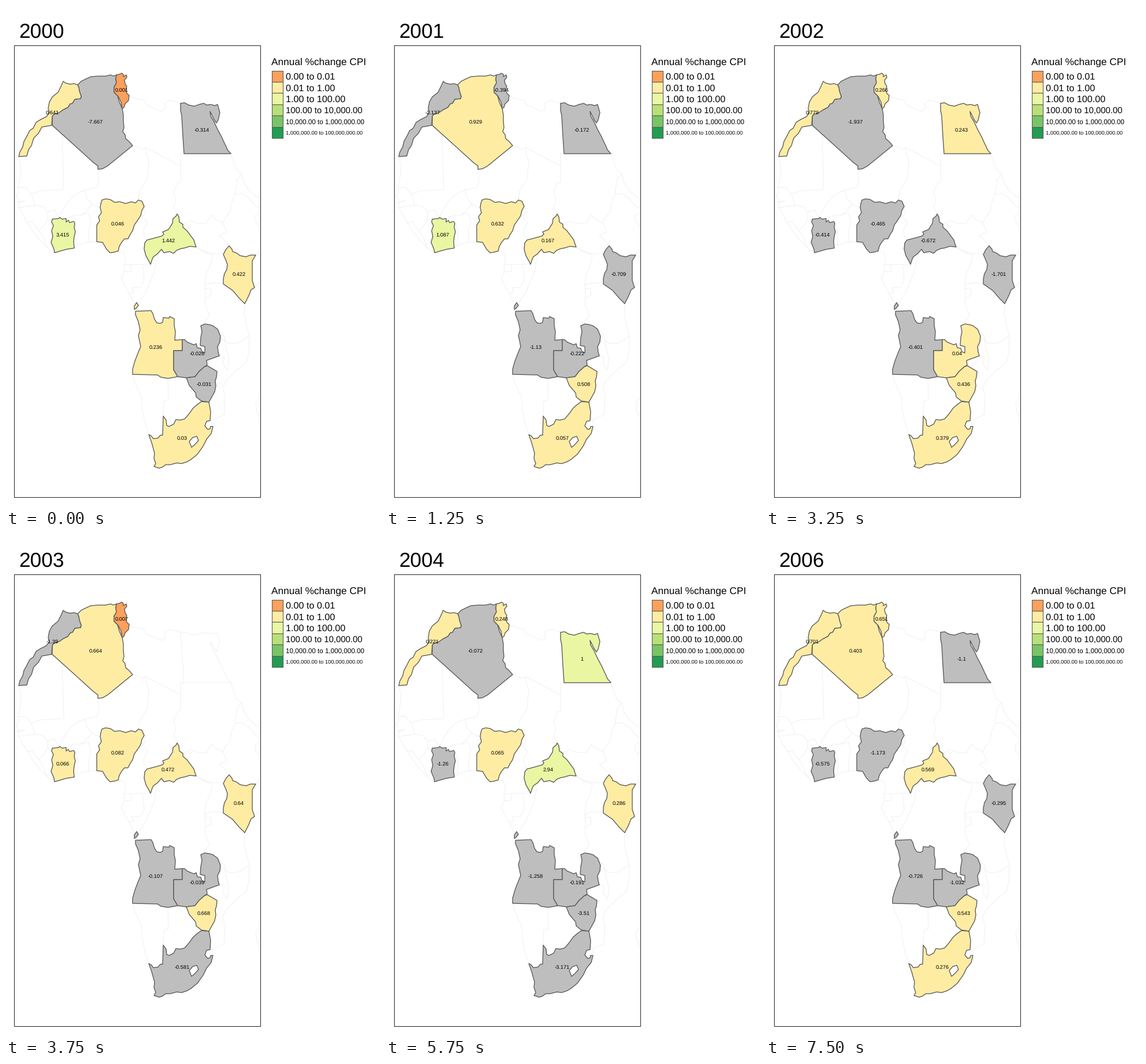
These frames come from a looping animation (647x865 px, 8 s). A matplotlib script:

```python
import matplotlib.pyplot as plt
import numpy as np
from matplotlib.animation import FuncAnimation
from matplotlib.patches import Polygon, Rectangle

W, H, DPI = 647, 865, 72          # at 72 dpi one point is one pixel
INTERVAL, FRAMES, HOLD = 250, 32, 1250
START_YEAR = 2000
EDGE, FAINT, GREY = "#5a5a5a", "#efefef", "#bebebe"
COLORS = ["#fca15b", "#feeca3", "#eaf6a2", "#b8e077", "#78c565", "#229c52"]
BREAKS = [0, 0.01, 1, 100, 1e4, 1e6]

plt.rcParams["font.family"] = "Liberation Sans"
plt.rcParams["text.hinting"] = "none"

fig = plt.figure(figsize=(W / DPI, H / DPI), dpi=DPI, facecolor="white")
ax = fig.add_axes([0, 0, 1, 1])
ax.set_xlim(0, W)
ax.set_ylim(H, 0)
ax.axis("off")

map_frame = Rectangle((13.5, 67.5), 426, 780, fill=False, ec="#222222", lw=1, zorder=6)
ax.add_patch(map_frame)
regions = []


def write(x, y, text, size, **kw):
    """Text whose digits are centred vertically on y."""
    return ax.text(x, y + 0.345 * size, text, size=size, color="black",
                   va="baseline", zorder=8, **kw)


def shape(points, color="white", zorder=3):
    patch = Polygon(points, closed=True, fc=color, ec=EDGE, lw=1.35,
                    joinstyle="round", zorder=zorder)
    return ax.add_patch(patch)


def region(label_at, values, *outlines):
    """A country with one value per year."""
    patches = [shape(o) for o in outlines]
    label = write(*label_at, "", 9.3, ha="center")
    regions.append((values, patches, label))


def border(*points):
    """A faint outline of a country without data."""
    x, y = zip(*points)
    line, = ax.plot(x, y, color=FAINT, lw=0.9, zorder=1)
    line.set_clip_path(map_frame)


# Northern neighbours
border((213, 155), (225, 160), (240, 163), (242, 170), (255, 176), (269, 182),
       (276, 178), (274, 168), (283, 163), (293, 165), (302, 168))
border((302, 168), (302, 180), (304, 190), (306, 225), (308, 255), (389, 255),
       (383, 248), (378, 237), (366, 213), (354, 190), (353, 183), (364, 202),
       (370, 184), (366, 170), (350, 170), (342, 168), (326, 173), (309, 168),
       (302, 168))
border((219, 241), (229, 244), (235, 248), (241, 244), (302, 276), (302, 255), (308, 255))
border((241, 244), (243, 256), (247, 268), (244, 300), (231, 320), (229, 335))
border((302, 276), (302, 304), (296, 306), (290, 322), (294, 335), (290, 346), (296, 359))
border((389, 255), (394, 270), (399, 283), (408, 290), (411, 303), (420, 318),
       (430, 327), (439, 332))
border((408, 290), (400, 299), (398, 312), (396, 325), (390, 340), (388, 355),
       (379, 366), (375, 374), (382, 390), (369, 396), (380, 406), (386, 414))
border((396, 325), (408, 324), (422, 333), (432, 346), (439, 349))
border((439, 357), (430, 363), (432, 373), (439, 380))
border((306, 377), (318, 371), (330, 375), (346, 376), (355, 361), (362, 368), (375, 374))

# Western neighbours
border((22, 260), (26, 275), (25, 290), (21, 314), (22, 322), (18, 328), (22, 338),
       (22, 348), (30, 362), (37, 374), (46, 388), (60, 406), (72, 418), (84, 426))
border((79, 206), (97, 222), (100, 317), (62, 319), (50, 322), (44, 325), (34, 313),
       (22, 314))
border((44, 325), (50, 344), (36, 346), (22, 348))
border((20, 338), (33, 336), (20, 341))
border((50, 344), (64, 346), (72, 356), (72, 368), (79, 372))
border((72, 368), (66, 379), (57, 388), (50, 380), (46, 372), (37, 374))
border((57, 388), (64, 398), (72, 418))
border((72, 356), (84, 352), (92, 367))
border((159, 282), (161, 300), (158, 313), (136, 318), (126, 322), (114, 330),
       (106, 340), (100, 350), (92, 365))
border((136, 318), (140, 332), (149, 342), (141, 351), (131, 361), (119, 361), (104, 367))
border((149, 342), (157, 347), (163, 347))
border((117, 372), (124, 384), (124, 412))
border((131, 361), (142, 357), (147, 372), (143, 388), (143, 408))
border((118, 417), (132, 410), (145, 407), (157, 407))

# Central neighbours
border((235, 337), (240, 347), (241, 358), (236, 363), (245, 374), (238, 386),
       (239, 396), (244, 404))
border((194, 423), (203, 424), (207, 438), (204, 447), (236, 446), (250, 446))
border((204, 447), (205, 459), (199, 470), (204, 480), (213, 496), (222, 514))
border((216, 447), (217, 458), (205, 459))
border((236, 446), (238, 458), (239, 474), (232, 486), (218, 486), (221, 495), (213, 496))
border((264, 424), (260, 440), (257, 458), (249, 478), (241, 496), (233, 507), (229, 517))
border((329, 416), (341, 424), (357, 430), (354, 446), (346, 463), (344, 482),
       (345, 500), (344, 515), (352, 534), (338, 552))
border((329, 416), (344, 424), (360, 428), (376, 427))
border((344, 482), (356, 478), (376, 479))
border((345, 488), (354, 487), (355, 499), (346, 504))
border((413, 514), (412, 532), (416, 550), (421, 570), (402, 582), (386, 583), (371, 572))
border((432, 430), (439, 420))
border((430, 486), (439, 475))

# Southern neighbours
border((421, 570), (420, 600), (415, 616), (398, 630), (380, 648), (375, 660),
       (379, 675), (377, 706), (358, 714), (358, 726))
border((366, 558), (378, 570), (380, 588), (386, 610), (383, 629), (375, 617),
       (378, 606), (369, 604))
border((219, 636), (223, 650), (234, 674), (236, 698), (241, 722), (247, 740))
border((297, 640), (280, 646), (281, 680), (273, 682), (272, 708))
border((439, 676), (432, 686), (434, 702), (439, 711))

region((155, 200), [-7.667, 0.929, -1.937, 0.664, -0.072, -1.874, 0.403],
       [(124, 136), (130, 130), (138, 126), (147, 122), (160, 121), (172, 121),
        (181, 119), (186, 121), (191, 119), (190, 126), (191, 133), (187, 140),
        (187, 149), (193, 155), (196, 166), (201, 177), (203, 188), (203, 198),
        (204, 210), (202, 217), (206, 222), (207, 229), (213, 234), (219, 241),
        (176, 276), (167, 281), (159, 282), (159, 276), (152, 271), (130, 251),
        (80, 206), (80, 190), (83, 187), (99, 179), (107, 175), (111, 169),
        (115, 168), (119, 161), (129, 160), (130, 156), (127, 147), (126, 141)])

region((80.5, 184), [0.641, -2.137, 0.779, -1.39, 0.221, -0.519, 0.701],
       [(99, 130), (103, 133), (111, 135), (118, 134), (124, 136), (126, 141),
        (127, 147), (130, 156), (129, 160), (119, 161), (115, 168), (111, 169),
        (107, 175), (99, 179), (92, 184), (83, 187), (80, 190), (79, 206),
        (62, 209), (56, 220), (48, 228), (44, 241), (39, 248), (36, 259),
        (22, 260), (24, 252), (29, 243), (31, 234), (36, 225), (41, 215),
        (47, 211), (52, 201), (60, 196), (70, 191), (75, 184), (73, 177),
        (75, 166), (80, 157), (90, 149), (95, 139)])

region((200, 145), [0.001, -0.394, 0.266, 0.007, 0.248, -1.508, 0.651],
       [(191, 119), (196, 118), (200, 116), (203, 118), (203, 122), (208, 119),
        (209, 123), (205, 128), (206, 134), (209, 139), (207, 146), (210, 152),
        (213, 154), (212, 163), (206, 169), (204, 175), (201, 177), (199, 166),
        (194, 156), (187, 149), (187, 140), (191, 133), (190, 126)])

region((338.5, 214), [-0.314, -0.172, 0.243, None, 1, 0.082, -1.1],
       [(302, 168), (309, 167), (316, 171), (326, 173), (334, 170), (342, 168),
        (347, 171), (354, 170), (361, 172), (366, 170), (370, 184), (367, 197),
        (364, 202), (360, 196), (356, 188), (353, 182), (354, 190), (360, 200),
        (366, 213), (373, 226), (378, 237), (381, 243), (383, 248), (389, 255),
        (308, 255), (306, 225), (304, 190), (302, 180)])

region((98, 395), [3.415, 1.087, -0.414, 0.066, -1.26, 0.624, -0.575],
       [(80, 368), (91, 367), (93, 365), (97, 368), (104, 367), (104, 373),
        (108, 370), (110, 374), (117, 372), (119, 375), (118, 382), (120, 390),
        (118, 398), (117, 407), (118, 418), (105, 420), (94, 423), (84, 426),
        (83, 420), (78, 408), (81, 398), (79, 388), (82, 379), (79, 373)])

region((193.5, 375.5), [0.046, 0.632, -0.465, 0.082, 0.065, 0.16, -1.173],
       [(166, 335), (172, 333), (180, 334), (188, 339), (197, 338), (207, 341),
        (217, 338), (224, 340), (229, 335), (235, 337), (239, 346), (235, 353),
        (233, 362), (227, 371), (222, 378), (219, 388), (215, 394), (211, 402),
        (205, 402), (200, 408), (196, 415), (194, 423), (187, 425), (180, 426),
        (174, 420), (167, 408), (157, 407), (157, 393), (157, 378), (162, 371),
        (160, 364), (165, 357), (163, 348), (164, 341)])

region((280.5, 405), [1.442, 0.167, -0.672, 0.472, 2.94, 1.778, 0.569],
       [(296, 359), (299, 364), (300, 373), (306, 377), (306, 382), (313, 388),
        (319, 396), (325, 404), (327, 411), (329, 416), (318, 415), (308, 418),
        (302, 419), (295, 422), (290, 427), (283, 424), (273, 426), (269, 420),
        (262, 428), (255, 433), (253, 437), (250, 446), (247, 440), (242, 431),
        (239, 420), (240, 409), (244, 404), (252, 402), (263, 399), (270, 397),
        (273, 394), (271, 390), (281, 386), (288, 375), (289, 367), (294, 363)])

region((403, 463), [0.422, -0.709, -1.701, 0.64, 0.286, -0.071, -0.295],
       [(386, 414), (391, 420), (392, 424), (398, 426), (405, 431), (415, 433),
        (423, 430), (432, 430), (426, 440), (426, 474), (430, 486), (424, 490),
        (420, 500), (413, 514), (403, 504), (392, 491), (376, 480), (376, 471),
        (378, 462), (382, 455), (383, 446), (380, 438), (376, 429), (380, 421)])

region((259, 588.5), [0.236, -1.13, -0.401, -0.107, -1.258, -0.897, -0.726],
       [(224, 527), (251, 526), (254, 531), (257, 541), (261, 547), (267, 548),
        (271, 546), (272, 538), (282, 539), (283, 536), (291, 540), (291, 552),
        (293, 562), (292, 577), (305, 576), (305, 595), (290, 595), (290, 628),
        (297, 640), (280, 643), (268, 641), (262, 637), (219, 636), (219, 627),
        (223, 613), (228, 600), (233, 588), (231, 578), (229, 569), (232, 559),
        (229, 545), (224, 533)],
       [(222, 518), (226, 512), (229, 517), (225, 522), (222, 524)])

region((330.5, 600), [-0.026, -0.222, 0.04, -0.039, -0.191, 0.019, -1.032],
       [(305, 576), (309, 576), (313, 580), (320, 583), (325, 585), (329, 583),
        (331, 590), (337, 591), (339, 597), (344, 599), (344, 588), (336, 586),
        (337, 572), (339, 562), (337, 552), (344, 549), (351, 550), (358, 552),
        (366, 558), (371, 570), (370, 580), (366, 588), (367, 597), (369, 604),
        (347, 612), (348, 620), (343, 623), (334, 631), (327, 640), (312, 642),
        (297, 640), (290, 628), (290, 595), (305, 595)])

region((342.5, 653), [-0.031, 0.508, 0.436, 0.668, -3.51, 0.773, 0.543],
       [(312, 642), (327, 640), (334, 631), (343, 623), (348, 621), (355, 625),
        (365, 631), (364, 641), (362, 647), (363, 656), (361, 666), (356, 675),
        (351, 684), (338, 682), (329, 675), (328, 668), (322, 661), (317, 655)])

region((305, 745.5), [0.03, 0.057, 0.379, -0.581, -3.171, 0.59, 0.276],
       [(338, 683), (351, 684), (354, 700), (353, 716), (347, 717), (344, 725),
        (349, 731), (353, 730), (354, 726), (358, 726), (355, 738), (347, 748),
        (341, 760), (331, 774), (320, 783), (313, 787), (304, 790), (295, 789),
        (284, 792), (276, 792), (271, 796), (265, 798), (256, 795), (259, 790),
        (256, 781), (257, 772), (252, 754), (247, 740), (251, 742), (255, 747),
        (263, 746), (267, 741), (271, 741), (272, 708), (277, 715), (278, 724),
        (282, 726), (290, 722), (294, 714), (301, 715), (309, 713), (316, 705),
        (324, 694), (331, 688)])
shape([(317, 752), (323, 745), (330, 743), (333, 750), (327, 757), (321, 762)], zorder=4)

title = write(22.7, 43, "", 35.2)
write(458.7, 95.2, "Annual %change CPI", 17.3)
legend = [("0.00 to 0.01", 16.1), ("0.01 to 1.00", 16.1), ("1.00 to 100.00", 16.1),
          ("100.00 to 10,000.00", 14.9), ("10,000.00 to 1,000,000.00", 11.65),
          ("1,000,000.00 to 100,000,000.00", 9.35)]
for i, (text, size) in enumerate(legend):
    top = 111.5 + 19.45 * i
    ax.add_patch(Rectangle((459.5, top), 19.5, 19.45, fc=COLORS[i], ec=EDGE, lw=1.1))
    write(483.8, top + 10.1, text, size)


def color_of(value):
    return ([GREY] + COLORS)[np.searchsorted(BREAKS, value, side="right")]


def update(frame):
    year = frame * INTERVAL // HOLD
    title.set_text(str(START_YEAR + year))
    for values, patches, label in regions:
        value = values[year]
        known = value is not None
        label.set_text(f"{value:g}" if known else "")
        for patch in patches:
            patch.set_visible(known)
            if known:
                patch.set_facecolor(color_of(value))
    return []


anim = FuncAnimation(fig, update, frames=FRAMES, interval=INTERVAL,
                     init_func=lambda: update(0), repeat=True, repeat_delay=0)
plt.show()
```
